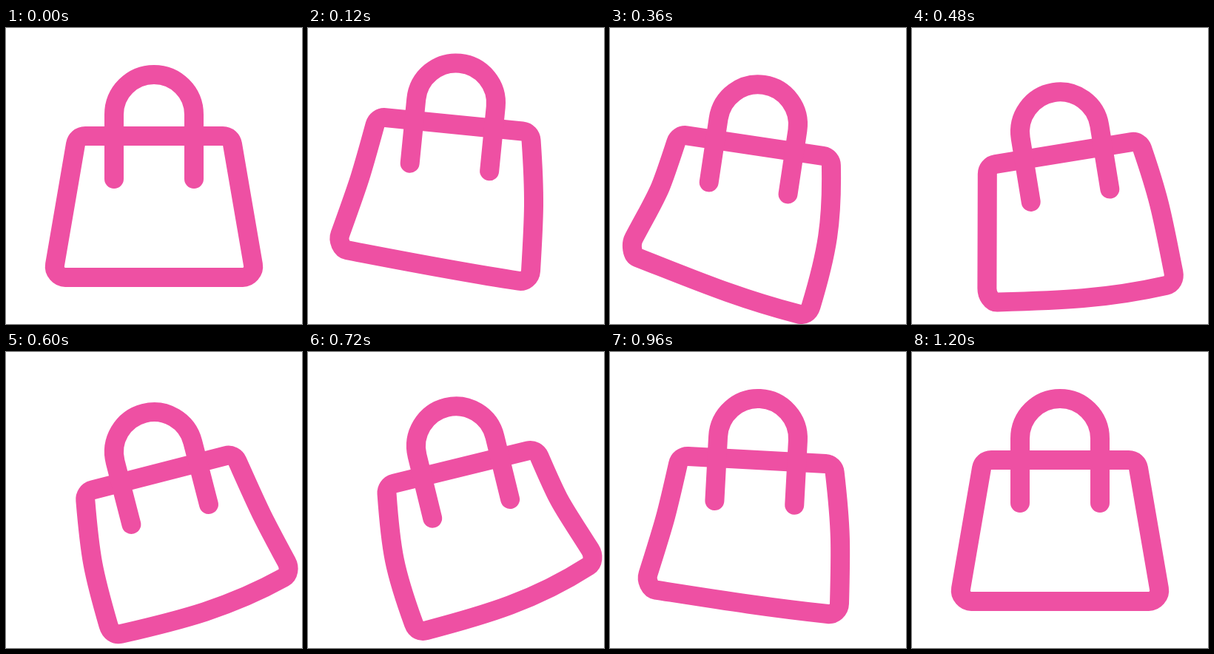
An HTML page that plays this animation: 400x400 px, repeating every 6230 ms.

```html
<!DOCTYPE html>
<html lang="en">
<head>
<meta charset="utf-8">
<title>Swinging bag</title>
<style>
  html, body { margin: 0; width: 100%; height: 100%; overflow: hidden; background: #fff; }
  svg { display: block; width: 100%; height: 100%; }
  path { fill: none; stroke: #ee50a3; stroke-width: 26; stroke-linecap: round; stroke-linejoin: round; }
</style>
</head>
<body>
<svg viewBox="0 0 400 400">
  <g id="swing">
    <path id="bag"/>
    <path d="M-54 87V0A54 54 0 0 1 54 0V87"/>
  </g>
</svg>
<script>
const LOOP = 6230, STEP = 30, END = 1200;
const swing = document.getElementById('swing');
const bag = document.getElementById('bag');

// Ease in and out; a smaller settle gives a longer, slower arrival.
function ease(u, settle = 2 / 3) {
  let low = 0, high = 1, s;
  for (let i = 0; i < 24; i++) {
    s = (low + high) / 2;
    const x = s * (1 - s) ** 2 + 3 * settle * s * s * (1 - s) + s ** 3;
    if (x < u) low = s; else high = s;
  }
  return s * s * (3 - 2 * s);
}

// Blends numbers, or nested lists of numbers.
const mix = (a, b, k) => Array.isArray(a) ? a.map((v, i) => mix(v, b[i], k)) : a + (b - a) * k;

// Keys are [ms, value, settle].
function follow(keys, t) {
  const next = Math.max(1, keys.findIndex(key => key[0] >= t));
  const [start, from] = keys[next - 1], [end, to, settle] = keys[next];
  return mix(from, to, ease((t - start) / (end - start), settle));
}

function offset([x, y], dx, dy, degrees) {
  const r = degrees * Math.PI / 180, c = Math.cos(r), s = Math.sin(r);
  return [x + dx * c - dy * s, y + dx * s + dy * c];
}

// Half of the bag from the top edge round to the bottom edge; side is -1 (left) or 1 (right).
// The bottom corner moves and tilts, the top stays with the handle.
function half(side, { corner, sideTilt = 0, bottomTilt = 0, depth = 14 }) {
  const slope = side * .17, reach = 76;
  const top = k => [side * 106 + slope * k, 40 + k];
  const onSide = k => offset(corner, side * 14 + slope * k, k - 3, sideTilt);
  const onBottom = k => offset(corner, side * k, depth, bottomTilt);
  return [
    [side * 93, 29], [side * 100, 29], top(-6), top(0),
    top(reach), onSide(-reach), onSide(0),
    onSide(9), onBottom(8), onBottom(0), onBottom(-85)
  ];
}

const pose = (left, right) => [...half(1, right), ...half(-1, left).reverse()];

const rest = pose({ corner: [-120, 206] }, { corner: [120, 206] });
const bentLeft = pose(
  { corner: [-132.6, 179], sideTilt: 12, bottomTilt: 14, depth: 21 },
  { corner: [90, 235], sideTilt: 20, bottomTilt: 8 });
const bentRight = pose(
  { corner: [-98, 218.4], sideTilt: -16, bottomTilt: -1 },
  { corner: [129.8, 183.7], sideTilt: -9, bottomTilt: -19, depth: 17 });

const angle = [[0, 0], [280, 14.4], [670, -15, .2], [980, 3.3], [END, 0]];
const lift = [[0, 0], [200, -24], [430, 24], [960, 0], [END, 0]];
const shape = [[0, rest], [290, bentLeft], [710, bentRight], [980, mix(rest, bentLeft, .42)], [END, rest]];

function draw(t) {
  const [start, ...curves] = follow(shape, t);
  bag.setAttribute('d', `M${start}C${curves.join(' ')}Z`);
  swing.setAttribute('transform', `translate(200 ${117 + follow(lift, t)}) rotate(${follow(angle, t)})`);
}

function frame() {
  const t = performance.now() % LOOP;
  draw(Math.min(Math.floor(t / STEP) * STEP, END));
  requestAnimationFrame(frame);
}
frame();
</script>
</body>
</html>
```
